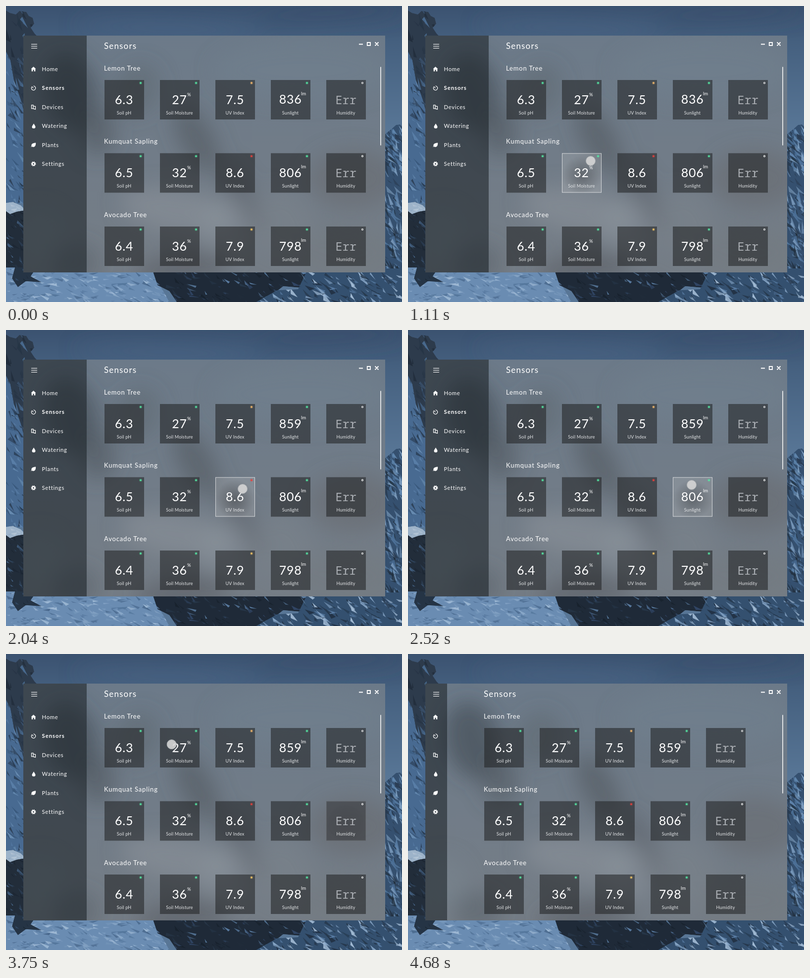
Write an HTML page that moves like this. It is 800x600 px and loops after 5430 ms.

```html
<!DOCTYPE html>
<html lang="en">
<head>
<meta charset="utf-8">
<title>Sensors</title>
<style>
html, body { margin: 0; width: 100%; height: 100%; overflow: hidden; background: #41597a; }
svg { display: block; width: 800px; height: 600px; font-family: Lato, "Open Sans", sans-serif; fill: #fff; }
.title { font-size: 17px; letter-spacing: 1.15px; }
.plant { font-size: 13px; letter-spacing: .85px; }
.nav { font-size: 11.3px; letter-spacing: .7px; }
.nav.on { font-weight: 700; letter-spacing: 1px; }
.value { font-size: 25px; letter-spacing: .8px; text-anchor: middle; }
.err { font-family: "Noto Sans Mono", "DejaVu Sans Mono", monospace; font-size: 23.5px; font-weight: 300; letter-spacing: 0; fill: #a9adb2; }
.unit { font-size: 9.5px; }
.label { font-size: 9px; letter-spacing: .2px; text-anchor: middle; fill: #e4e6e8; }
.line { fill: none; stroke: #fff; }
</style>
</head>
<body>
<svg id="stage" viewBox="0 0 800 600" xmlns="http://www.w3.org/2000/svg"></svg>
<script>
const LOOP = 5430, TRAVEL = 390;
const stage = document.getElementById('stage');
const clamp = v => Math.max(0, Math.min(1, v));
const ramp = (a, b, v) => clamp((v - a) / (b - a));
const ease = p => p * p * (3 - 2 * p);
const easeOut = p => 1 - (1 - p) ** 3;
const mix = (a, b, p) => a + (b - a) * p;
const $ = id => document.getElementById(id);

let seed = 11;
const rnd = () => (seed = (seed * 16807) % 2147483647) / 2147483647;

// Mountain areas: outline, base tone, shard tones, shard count, slant, shard length
const slopes = [
  ['0,9 8,14 20,17 27,10 41,12 46,20 54,24 57,36 50,44 58,56 66,64 66,400 0,400', '#2d3b4c',
    ['#1f2a38', '#3f5b7b', '#4d7198', '#263445'], 130, 62, 30],
  ['0,92 9,110 16,150 30,190 42,235 42,400 0,400', '#486a91',
    ['#5a7fa8', '#26384d', '#38577a', '#6b8fb5', '#2b3d53'], 90, 58, 28],
  ['0,400 14,397 28,404 42,414 42,545 0,545', '#222d3a',
    ['#1a2430', '#31465f', '#4b6c92', '#253242'], 70, 50, 22],
  ['0,399 14,397 30,404 40,414 22,417 8,422 0,416', '#9db3c9', ['#b9c9d9', '#7f9bb9'], 8, 5, 16],
  ['755,270 768,258 779,249 788,241 796,240 800,244 800,545 755,545', '#35506f',
    ['#21303f', '#4d7198', '#6289b2', '#2a3d53', '#7fa0c2'], 170, 58, 30],
  ['0,530 320,530 308,560 330,600 0,600', '#6a8cb2',
    ['#8aa8c9', '#54769c', '#a3bdd8', '#48678b', '#7697bb'], 230, 14, 22],
  ['18,530 62,530 50,548 72,560 40,558 24,570 12,552', '#253445', ['#3b567a', '#1d2936'], 14, 35, 14],
  ['296,536 350,532 620,532 640,552 606,572 560,568 520,600 345,600 330,578 306,566', '#1f2a38',
    ['#17212c', '#33496a', '#5d80a6', '#28384a', '#202c3a'], 150, 32, 22],
  ['610,532 810,532 810,600 505,600 548,576 590,574', '#34506f',
    ['#213144', '#8aa9ca', '#587ca4', '#a7c0da', '#26384c'], 150, 36, 28]
];

function slope([outline, base, tones, count, slant, size], i) {
  const xy = outline.split(/[ ,]/).map(Number);
  const xs = xy.filter((_, k) => k % 2 === 0), ys = xy.filter((_, k) => k % 2);
  const x0 = Math.min(...xs), x1 = Math.max(...xs), y0 = Math.min(...ys), y1 = Math.max(...ys);
  let out = `<clipPath id="s${i}"><polygon points="${outline}"/></clipPath><g clip-path="url(#s${i})"><polygon points="${outline}" fill="${base}"/>`;
  for (let n = 0; n < count; n++) {
    const x = mix(x0, x1, rnd()), y = mix(y0, y1, rnd()), l = size * (.3 + rnd() * .7);
    const a = (slant + (rnd() - .5) * 50) * Math.PI / 180, w = l * (.12 + rnd() * .22);
    const dx = Math.cos(a), dy = Math.sin(a), k = rnd();
    out += `<path d="M${x.toFixed(1)},${y.toFixed(1)}l${(dx * l).toFixed(1)},${(dy * l).toFixed(1)}l${(-dx * l * k - dy * w).toFixed(1)},${(-dy * l * k + dx * w).toFixed(1)}z" fill="${tones[n % tones.length]}" opacity="${(.5 + rnd() * .45).toFixed(2)}"/>`;
  }
  return out + '</g>';
}

// Soft blurred patches behind the glass: x, y, rx, ry, turn, colour, opacity
const blobs = [
  [130, 175, 55, 80, -15, '#3d454c', .55],
  [185, 255, 38, 50, 0, '#4b535b', .5],
  [265, 170, 45, 55, 20, '#565e66', .35],
  [385, 270, 34, 75, -28, '#50565c', .55],
  [475, 390, 26, 80, -25, '#555a60', .45],
  [345, 415, 115, 45, 10, '#8c949c', .55],
  [445, 445, 50, 60, 0, '#8d959d', .45],
  [560, 440, 60, 70, -20, '#7e858c', .4],
  [360, 530, 100, 30, -8, '#53595f', .5],
  [700, 350, 90, 60, 0, '#696a6e', .55],
  [690, 500, 100, 50, 0, '#757a80', .5],
  [600, 130, 180, 60, 0, '#73818f', .5],
  [70, 470, 50, 60, 0, '#7b8892', .4],
  [140, 520, 50, 40, 0, '#50585f', .4]
];
const blob = ([x, y, rx, ry, turn, c, o]) =>
  `<ellipse rx="${rx}" ry="${ry}" transform="translate(${x} ${y}) rotate(${turn})" fill="${c}" opacity="${o}"/>`;

const GREEN = '#55eaa5', AMBER = '#f4c765', RED = '#e8403c';
const plants = [
  ['Lemon Tree', 150, ['6.3', '27', '7.5', '836', 'Err'], '#f6b96c'],
  ['Kumquat Sapling', 298.4, ['6.5', '32', '8.6', '806', 'Err'], RED],
  ['Avocado Tree', 447, ['6.4', '36', '7.9', '798', 'Err'], AMBER]
];
const labels = ['Soil pH', 'Soil Moisture', 'UV Index', 'Sunlight', 'Humidity'];
const units = ['', '%', '', 'lm', ''];

function dot(color, id) {
  if (!color) return '<circle class="line" cx="73" cy="6" r="1.5" stroke-width="1.1"/>';
  return `<circle id="glow${id}" cx="73" cy="6" r="3.1" fill="${color}" opacity=".28"/><circle cx="73" cy="6" r="1.7" fill="${color}"/>`;
}

function tile(row, col, y, value, uv) {
  const id = `${row}${col}`, color = [GREEN, GREEN, uv, GREEN, ''][col];
  const unit = units[col] && `<text class="unit" x="${col === 1 ? 55 : 61}" y="${col === 1 ? 32.5 : 31}">${units[col]}</text>`;
  const hover = row !== 1 ? '' : `<g id="hover${col}" opacity="0"><rect width="80" height="80" fill="#fff" fill-opacity=".17"/>
    <rect width="80" height="80" fill="url(#shade)"/><rect class="line" x=".5" y=".5" width="79" height="79" stroke-opacity=".65"/></g>`;
  return `<g transform="translate(${199 + 112 * col} ${y})">
    <rect id="tile${id}" width="80" height="80" fill="#242526" fill-opacity=".58"/>${hover}${dot(color, id)}
    <text id="value${id}" class="value${col === 4 ? ' err' : ''}" x="39.6" y="49">${value}</text>${unit}
    <text class="label" x="39.5" y="70">${labels[col]}</text></g>`;
}

const plantRow = ([name, y, values, uv], row) =>
  `<text class="plant" x="198" y="${y - 19}">${name}</text>` + values.map((v, col) => tile(row, col, y, v, uv)).join('');

const icons = [
  ['Home', '<path d="M0-5 5-.6H3.8V4.5H1.2V1.2H-1.2V4.5H-3.8V-.6H-5z"/>'],
  ['Sensors', '<path class="line" d="M-2.6-3.3A4.2 4.2 0 1 0 0-4.2M0 0-2.6-2.4" stroke-width="1.2"/>'],
  ['Devices', '<path class="line" d="M-4-4H-.4V3H-4zM-.4-2 4-1.2V4.6L-.4 3.4z" stroke-width="1.2"/>'],
  ['Watering', '<path d="M.5-5C1.6-2.4 4 -.4 4 1.7A3.5 3.3 0 0 1-3 1.7C-3-.4-.6-2.4 .5-5z"/>'],
  ['Plants', '<path d="M4.6-4.4C5 1 3.2 4.2-.6 4.2-2 4.2-2.8 3.7-3.3 3.2L-4.6 4.6-5 4-3.9 2.4C-5.2-1.6-1.6-3.8 4.6-4.4z"/>'],
  ['Settings', '<circle class="line" r="2.6" stroke-width="2.2"/><circle class="line" r="4.2" stroke-width="1.6" stroke-dasharray="1.65 1.65"/>']
];
const navY = i => 128 + 38.4 * i;
const bar = y => `<path class="line" d="M51 ${y}H63" stroke-width="1.1"/>`;

stage.innerHTML = `
<defs>
  <linearGradient id="sky" x2="0" y2="1"><stop stop-color="#3b5270"/><stop offset=".12" stop-color="#45607f"/><stop offset=".42" stop-color="#587696"/></linearGradient>
  <linearGradient id="glass" x2="0" y2="1"><stop stop-color="#6c7a89"/><stop offset=".5" stop-color="#717c88"/><stop offset="1" stop-color="#757d86"/></linearGradient>
  <radialGradient id="shade" cy=".56" r=".5"><stop stop-color="#202224" stop-opacity=".36"/><stop offset="1" stop-color="#202224" stop-opacity="0"/></radialGradient>
  <filter id="soft" x="-20%" y="-20%" width="140%" height="140%"><feGaussianBlur stdDeviation="20"/></filter>
  <clipPath id="win"><rect x="35" y="60" width="731" height="480"/></clipPath>
  <clipPath id="sideClip"><rect id="sideBox" x="35" y="60" width="128" height="480"/></clipPath>
</defs>
<rect width="800" height="600" fill="url(#sky)"/>
<g filter="url(#soft)">${blob([330, 45, 190, 14, 2, '#506b8b', .5])}${blob([650, 15, 160, 14, -3, '#364d6a', .6])}</g>
${slopes.map(slope).join('')}
<g clip-path="url(#win)"><rect x="35" y="60" width="731" height="480" fill="url(#glass)"/>
  <g filter="url(#soft)">${blobs.map(blob).join('')}</g></g>
<rect id="side" x="35" y="60" width="128" height="480" fill="#1c2328" fill-opacity=".58"/>
${[77.5, 81.5, 85.5].map(bar).join('')}
${icons.map(([, art], i) => `<g transform="translate(55.5 ${navY(i)})">${art}</g>`).join('')}
<g clip-path="url(#sideClip)"><g id="names">${icons.map(([name], i) => `<text class="nav${i === 1 ? ' on' : ''}" x="72.5" y="${navY(i) + 4}">${name}</text>`).join('')}</g></g>
<g id="content"><text class="title" x="198" y="87">Sensors</text>${plants.map(plantRow).join('')}</g>
<path class="line" d="M713 77.5H721M729.8 74H736V80H729.8zM745.5 73.5 752.5 80.5M752.5 73.5 745.5 80.5" stroke-width="1.8"/>
<path class="line" d="M757 123.5V282.5" stroke="#d5d9dc" stroke-width="1.8" stroke-opacity=".85"/>
<circle id="cursor" r="9.5" fill="#d6d6d6" fill-opacity=".9" stroke="#aaaeb1" stroke-width="1"/>`;

// Cursor stops and, per leg, start time and vertical bend of the path
const stops = [[187, 267], [245, 318], [369, 314], [478, 322], [573, 314], [690, 314], [57, 81]];
const legs = [[60, 0], [720, 156], [1470, 136], [2130, 0], [2790, 0], [3540, 0]];

function cursorAt(t) {
  let n = 0;
  while (n < legs.length - 1 && t >= legs[n + 1][0]) n++;
  const p = ease(ramp(0, TRAVEL, t - legs[n][0])), [a, b] = [stops[n], stops[n + 1]];
  return [mix(a[0], b[0], p), mix(a[1], b[1], p) + 2 * p * (1 - p) * legs[n][1]];
}

function draw(t) {
  for (let i = 0; i < 5; i++) {
    const enter = ramp(.5, 1, (t - legs[i][0]) / TRAVEL);
    const leave = ramp(.2, .65, (t - legs[i + 1][0]) / TRAVEL);
    const h = ease(enter) * (1 - ease(leave));
    $('hover' + i).setAttribute('opacity', h);
    $('tile1' + i).setAttribute('fill-opacity', .58 - .52 * h);
  }

  const count = Math.round(mix(836, 859, ramp(1770, 2040, t)));
  $('value03').textContent = count;
  $('value03').setAttribute('y', count === 836 ? 48 : 49);
  const pulse = Math.sin(Math.PI * ramp(1650, 2010, t));
  $('glow03').setAttribute('r', 3.1 + 2.9 * pulse);

  const [x, y] = cursorAt(t), press = ease(ramp(3930, 4050, t)), c = $('cursor');
  c.setAttribute('transform', `translate(${x} ${y})`);
  c.setAttribute('r', 9.5 - 2.2 * press);
  c.setAttribute('opacity', ramp(60, 150, t) * mix(1, .62, press) * (1 - ramp(4300, 4440, t)));

  const fold = easeOut(ramp(4290, 4680, t)), width = 128 - 84 * fold;
  $('side').setAttribute('width', width);
  $('sideBox').setAttribute('width', width);
  $('names').setAttribute('opacity', 1 - ramp(0, .85, fold));
  $('content').setAttribute('transform', `translate(${-45 * fold} 0)`);
}

const start = performance.now();
function tick() {
  draw((performance.now() - start) % LOOP);
  requestAnimationFrame(tick);
}
draw(0);
requestAnimationFrame(tick);
</script>
</body>
</html>
```
